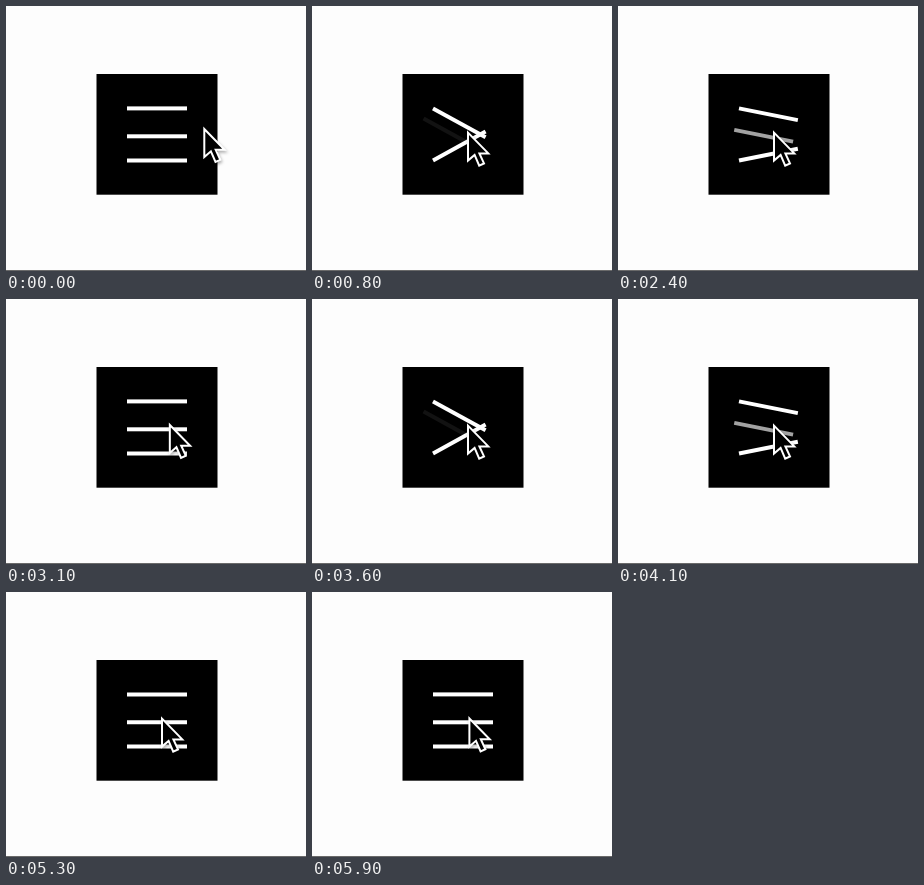
Recreate the animation shown at these times as an HTML page. Size 300 by 265 pixels, loop 6000 ms.

```html
<!DOCTYPE html>
<html lang="en">
<head>
<meta charset="utf-8">
<title>Menu button</title>
<style>
  html, body { margin: 0; width: 100%; height: 100%; overflow: hidden; background: #fdfdfd; }
  svg { display: block; width: 300px; height: 265px; }
  .bar { fill: #fff; }
  #cursor path { fill: #000; stroke: #fff; stroke-width: 2; }
  #cursor { filter: drop-shadow(1px 2px 1.5px rgba(0, 0, 0, .3)); }
</style>
</head>
<body>
<svg viewBox="0 0 300 265">
  <rect y="264" width="300" height="1" fill="#6a6a6a"/>
  <rect x="90.5" y="68" width="121" height="120.7"/>
  <rect class="bar" id="top" x="121" y="100.4" width="60" height="4"/>
  <rect class="bar" id="mid" x="121" y="128.3" width="60" height="4"/>
  <rect class="bar" id="low" x="121" y="152.5" width="60" height="4"/>
  <g id="cursor">
    <path d="M0 0V28L6.6 22.3L11.2 33L16 30.8L11.4 20.8H20.3Z"/>
  </g>
</svg>
<script>
  const LOOP = 6000, STEP = 100;

  // Each click flips the menu: open, close, open, ...
  const clicks = [670, 1218, 1770, 2242, 3470, 3942, 4530, 4960];
  const TOGGLE = 350;

  // The pointer jumps out, waits, then glides back in
  const jumps = [0, 2800, 5500];
  const WAIT = [200, 100, 100], GLIDE = 390;
  const outside = { x: 198.3, y: 123 }, inside = { x: 156, y: 126.6 };

  const $ = id => document.getElementById(id);
  const bars = { top: $("top"), mid: $("mid"), low: $("low") };
  const cursor = $("cursor");

  const mix = (a, b, k) => a + (b - a) * k;
  const bez = (a, b, u) => 3 * a * u * (1 - u) ** 2 + 3 * b * u * u * (1 - u) + u ** 3;

  // The standard CSS "ease" curve
  function ease(x) {
    if (x <= 0) return 0;
    if (x >= 1) return 1;
    let lo = 0, hi = 1;
    for (let i = 0; i < 24; i++) {
      const u = (lo + hi) / 2;
      if (bez(.25, .25, u) < x) lo = u; else hi = u;
    }
    return bez(.1, 1, lo);
  }

  const openness = t => clicks.reduce(
    (p, start, i) => mix(p, 1 - i % 2, ease((t - start) / TOGGLE)), 0);

  function pointer(t) {
    const i = jumps.filter(j => j <= t).length - 1;
    const k = ease((t - jumps[i] - WAIT[i]) / GLIDE);
    return [mix(outside.x, inside.x, k), mix(outside.y, inside.y, k)];
  }

  const rotate = (el, deg, x, y) => el.setAttribute("transform", `rotate(${deg} ${x} ${y})`);

  function draw(now) {
    const t = Math.floor((now % LOOP) / STEP) * STEP;
    const p = openness(t), angle = 45 * p;
    rotate(bars.top, angle, 121, 102.4);
    rotate(bars.mid, angle, 151, 103);
    rotate(bars.low, -angle, 121, 154.5);
    bars.mid.setAttribute("opacity", Math.max(0, 1 - 1.45 * p));
    cursor.setAttribute("transform", `translate(${pointer(t)})`);
  }

  function tick() {
    draw(performance.now());
    requestAnimationFrame(tick);
  }
  tick();
</script>
</body>
</html>
```
